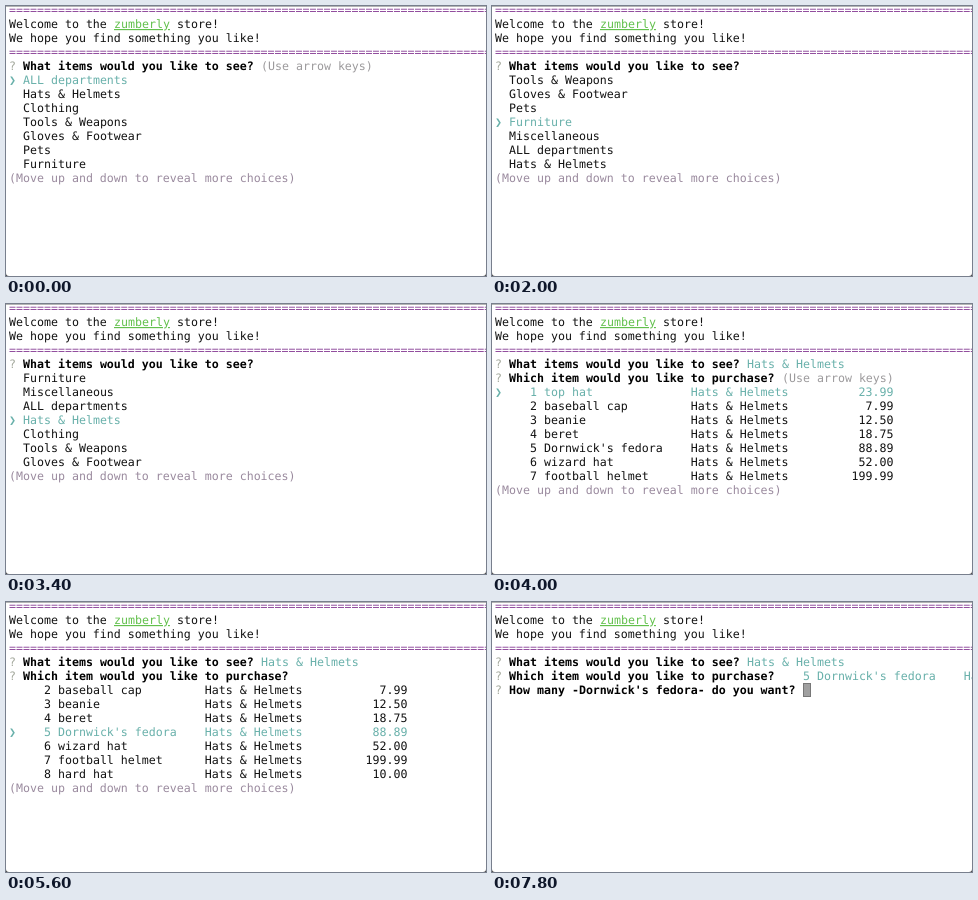
These frames come from a looping animation (480 by 270 pixels, 8000 ms). An HTML page:

```html
<!DOCTYPE html>
<html lang="en">
<head>
<meta charset="utf-8">
<title>Store prompt</title>
<style>
  html, body { margin: 0; width: 100%; height: 100%; overflow: hidden; background: #fff; }
  svg { display: block; width: 100vw; height: 100vh; }
  text {
    font: 11.627px "DejaVu Sans Mono", monospace;
    white-space: pre;
    text-rendering: geometricPrecision;
    fill: #111;
  }
  .bold { font-weight: bold; fill: #000; }
  .rule { fill: #8f4a9c; }
  .brand { fill: #62c04c; text-decoration: underline; }
  .pick { fill: #68b0aa; }
  .mark { fill: #a3a89c; }
  .hint { fill: #9c9a9c; }
  .more { fill: #9a8a9e; }
</style>
</head>
<body>
<svg viewBox="0 0 480 270" preserveAspectRatio="none">
  <rect width="480" height="270" fill="#fff"/>
  <rect width="480" height="1" fill="#b4b4b4"/>
  <path d="M0 267V270H3Q0 270 0 267ZM480 267V270H477Q480 270 480 267Z" fill="#444"/>
  <g id="screen"></g>
</svg>
<script>
const NS = "http://www.w3.org/2000/svg";
const LOOP = 8000, CELL = 7, LINE = 14, PAGE = 7, HOLD_ROW = 3;
const screen = document.getElementById("screen");

const departments = ["ALL departments", "Hats & Helmets", "Clothing", "Tools & Weapons",
  "Gloves & Footwear", "Pets", "Furniture", "Miscellaneous"];
const chosen = departments[1];
const fedora = "Dornwick's fedora";
const products = [["top hat", "23.99"], ["baseball cap", "7.99"], ["beanie", "12.50"],
  ["beret", "18.75"], [fedora, "88.89"], ["wizard hat", "52.00"],
  ["football helmet", "199.99"], ["hard hat", "10.00"]]
  .map(([name, price], i) =>
    `   ${i + 1} ${name.padEnd(21)}${chosen.padEnd(20)}${price.padStart(9)}`);

// Times of the down-arrow presses and of each Enter
const departmentKeys = [200, 600, 800, 1200, 1600, 2000, 2200, 2600, 3000];
const productKeys = [4400, 4600, 5000, 5400];
const departmentEnter = 3600, productEnter = 6600;

const presses = (keys, t) => keys.filter(k => k <= t).length;

function put(col, row, str, cls = "") {
  const el = document.createElementNS(NS, "text");
  el.setAttribute("x", 3 + col * CELL);
  el.setAttribute("y", 8 + row * LINE);
  el.setAttribute("class", cls);
  el.textContent = str;
  screen.append(el);
}

function ask(row, question, note = "", cls = "hint") {
  put(0, row, "?", "mark");
  put(2, row, question, "bold");
  if (note) put(3 + question.length, row, note, cls);
}

// The pointer sinks to the middle row, then the choices scroll past it endlessly
function menu(row, choices, moves) {
  const at = Math.min(moves, HOLD_ROW);
  for (let i = 0; i < PAGE; i++) {
    const active = i === at;
    if (active) put(0, row + i, "❯", "pick");
    put(2, row + i, choices[(moves - at + i) % choices.length], active ? "pick" : "");
  }
  put(0, row + PAGE, "(Move up and down to reveal more choices)", "more");
}

function header() {
  const rule = "=".repeat(69);
  put(0, 0, rule, "rule");
  put(0, 1, "Welcome to the ");
  put(15, 1, "zumberly", "brand");
  put(24, 1, "store!");
  put(0, 2, "We hope you find something you like!");
  put(0, 3, rule, "rule");
}

function cursor(col, row) {
  const el = document.createElementNS(NS, "rect");
  const box = { x: 3.5 + col * CELL, y: row * LINE - 2.5, width: 7, height: 13,
    fill: "#a0a0a0", stroke: "#777" };
  for (const key in box) el.setAttribute(key, box[key]);
  screen.append(el);
}

function draw(stage, moves) {
  const note = moves ? "" : "(Use arrow keys)";
  const first = "What items would you like to see?";
  const second = "Which item would you like to purchase?";
  screen.replaceChildren();
  header();

  if (stage === 0) {
    ask(4, first, note);
    menu(5, departments, moves);
    return;
  }
  ask(4, first, chosen, "pick");
  if (stage === 1) {
    ask(5, second, note);
    menu(6, products, moves);
    return;
  }
  const third = `How many -${fedora}- do you want?`;
  ask(5, second, products[4], "pick");
  ask(6, third);
  cursor(3 + third.length, 6);
}

let shown = "";
function tick(now) {
  const t = now % LOOP;
  const stage = t < departmentEnter ? 0 : t < productEnter ? 1 : 2;
  const moves = presses(stage ? productKeys : departmentKeys, t);
  const state = `${stage}:${moves}`;
  if (state !== shown) {
    draw(stage, moves);
    shown = state;
  }
  requestAnimationFrame(tick);
}
const start = performance.now();
const frame = () => tick(Math.max(0, performance.now() - start));
draw(0, 0);
requestAnimationFrame(function run() {
  const t = Math.max(0, performance.now() - start) % LOOP;
  const stage = t < departmentEnter ? 0 : t < productEnter ? 1 : 2;
  const moves = presses(stage ? productKeys : departmentKeys, t);
  const state = `${stage}:${moves}`;
  if (state !== shown) {
    draw(stage, moves);
    shown = state;
  }
  requestAnimationFrame(run);
});
</script>
</body>
</html>
```
